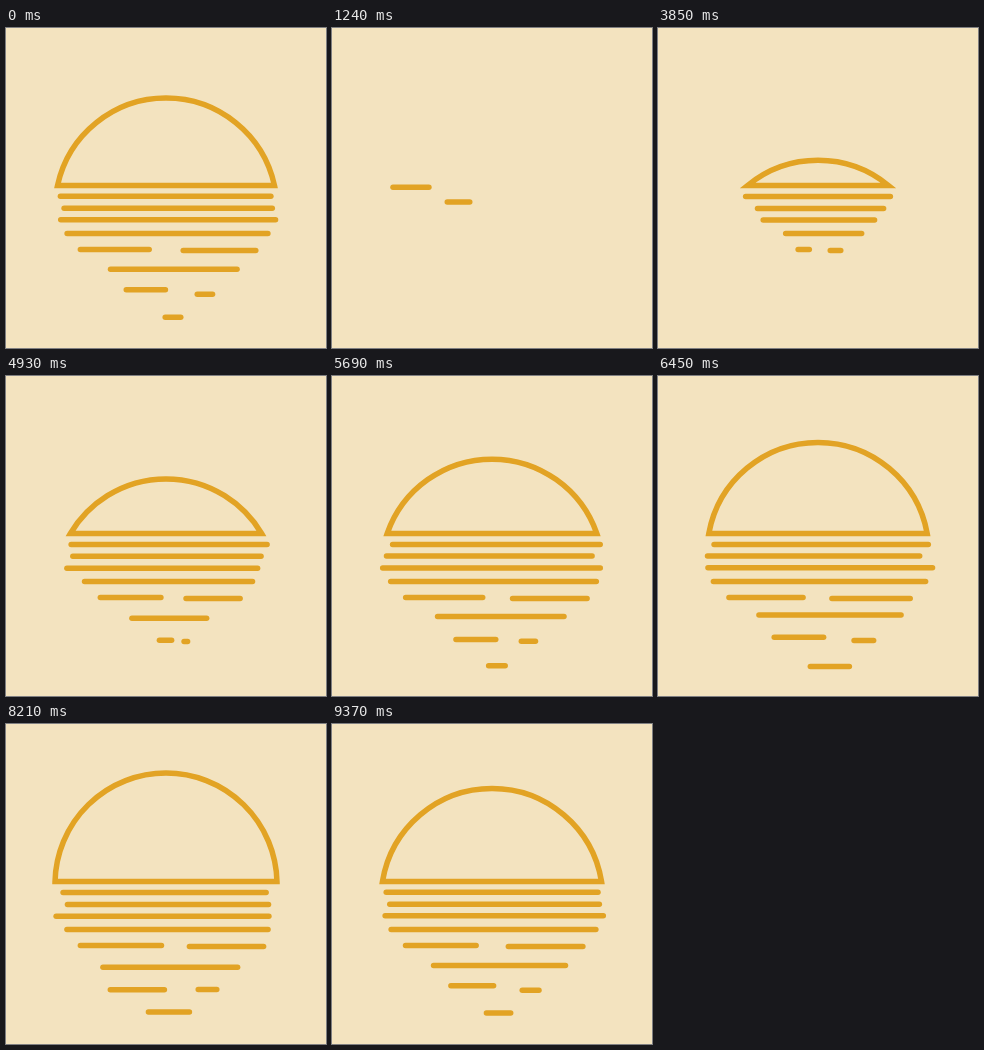
Animation, 320 px wide and 320 px high, one loop 9.41 s. Source, as an HTML page:

```html
<!DOCTYPE html>
<html lang="en">
<head>
<meta charset="utf-8">
<title>Sun over water</title>
<style>
  html, body { margin: 0; width: 100%; height: 100%; overflow: hidden; background: #f3e3bf; }
  svg { display: block; width: 100vw; height: 100vh; }
  path { fill: none; stroke: #e2a324; stroke-width: 5.5; }
  #sun { stroke-linejoin: miter; stroke-miterlimit: 10; }
  .ray { stroke-linecap: round; }
</style>
</head>
<body>
<svg id="stage" viewBox="0 0 320 320"><path id="sun"/></svg>
<script>
const LOOP = 9410, START = 2000;
const HORIZON = 157.5, R = 111, HIGH = 49, LOW = 175;
const FADE = 9200, BREATH = 2920, PEAK = 9370;
const stage = document.getElementById('stage');
const sun = document.getElementById('sun');
const rays = [];

const clamp = v => Math.min(1, Math.max(0, v));
const mix = (a, b, k) => a + (b - a) * k;
const sine = v => (1 - Math.cos(Math.PI * clamp(v))) / 2;
const wave = (t, period, peak) => Math.cos(2 * Math.PI * (t - peak) / period);

// Deeper reflections appear later, grow faster and vanish sooner.
function ray(y, x, half, options) {
  const depth = (y - 168) / 121;
  const el = document.createElementNS(stage.namespaceURI, 'path');
  el.setAttribute('class', 'ray');
  stage.append(el);
  rays.push({
    el, y, x, half,
    born: 2300 + 3000 * depth,
    grow: 2900 - 1580 * depth,
    fade: 1200 - 930 * depth,
    from: 161, sway: 0, period: 3000, peak: PEAK,
    bob: 0, breath: 0.03, dx: 0, dy: 0,
    ...options
  });
}

// The two top rays linger and drift off after sunset.
ray(168.4, 161.5, 104, { sway: 2.9, period: 5000, peak: 5690, fade: 1600, dx: -101, dy: -11 });
ray(180.2, 159.6, 103, { sway: 4, period: 5000, peak: 8950, bob: 0.3, fade: 1540, dx: -37, dy: -7 });
ray(192, 159, 109, { sway: 3.3, bob: -0.3 });
ray(205.5, 161.5, 103, { from: 168 });
ray(221.5, 111.5, 39, { from: 152, sway: 3.5, period: 3200, peak: 8100, breath: -0.05 });
ray(222.4, 216.5, 38, { from: 172, sway: 4, peak: 8210 });
ray(241.2, 168, 69, { sway: 4, period: 4000, peak: 6450, bob: -2.3 });
ray(263.8, 135.5, 26, { from: 168, sway: 5.5, bob: -2.5, breath: -0.05 });
ray(265.5, 202, 9.5, { from: 175, sway: 4, period: 5600, peak: 6700, bob: -1 });
ray(289.3, 167.5, 20.5, { sway: 5, period: 4400, peak: 6300, bob: 1.3, breath: 0 });

function drawSun(t) {
  const up = sine((t - 1000) / 7200) - sine((t - 9143) / 1000);
  const d = mix(LOW, HIGH, up) + R - HORIZON;
  if (d >= R - 0.5) return sun.setAttribute('d', '');
  const half = Math.sqrt(R * R - d * d);
  sun.setAttribute('d',
    `M${160 - half} ${HORIZON}A${R} ${R} 0 0 1 ${160 + half} ${HORIZON}Z`);
}

function drawRay(r, t) {
  const grown = 1 - (1 - clamp((t - r.born) / r.grow)) ** 1.5;
  const gone = clamp((t - FADE) / r.fade) ** 2;
  const size = grown * (1 - gone);
  if (size <= 0) return r.el.setAttribute('d', '');
  const w = wave(t, r.period, r.peak) * size;
  const x = mix(r.from, r.x, grown) + r.sway * w + r.dx * gone;
  const y = r.y + r.bob * w + r.dy * gone;
  const half = r.half * size * (1 + r.breath * wave(t, BREATH, PEAK));
  r.el.setAttribute('d', `M${x - half} ${y}H${x + half}`);
}

function draw(ms) {
  let t = ms % LOOP;
  if (t < START) t += LOOP;
  drawSun(t);
  rays.forEach(r => drawRay(r, t));
}

const began = performance.now();
function tick() {
  draw(performance.now() - began);
  requestAnimationFrame(tick);
}
draw(0);
requestAnimationFrame(tick);
</script>
</body>
</html>
```
